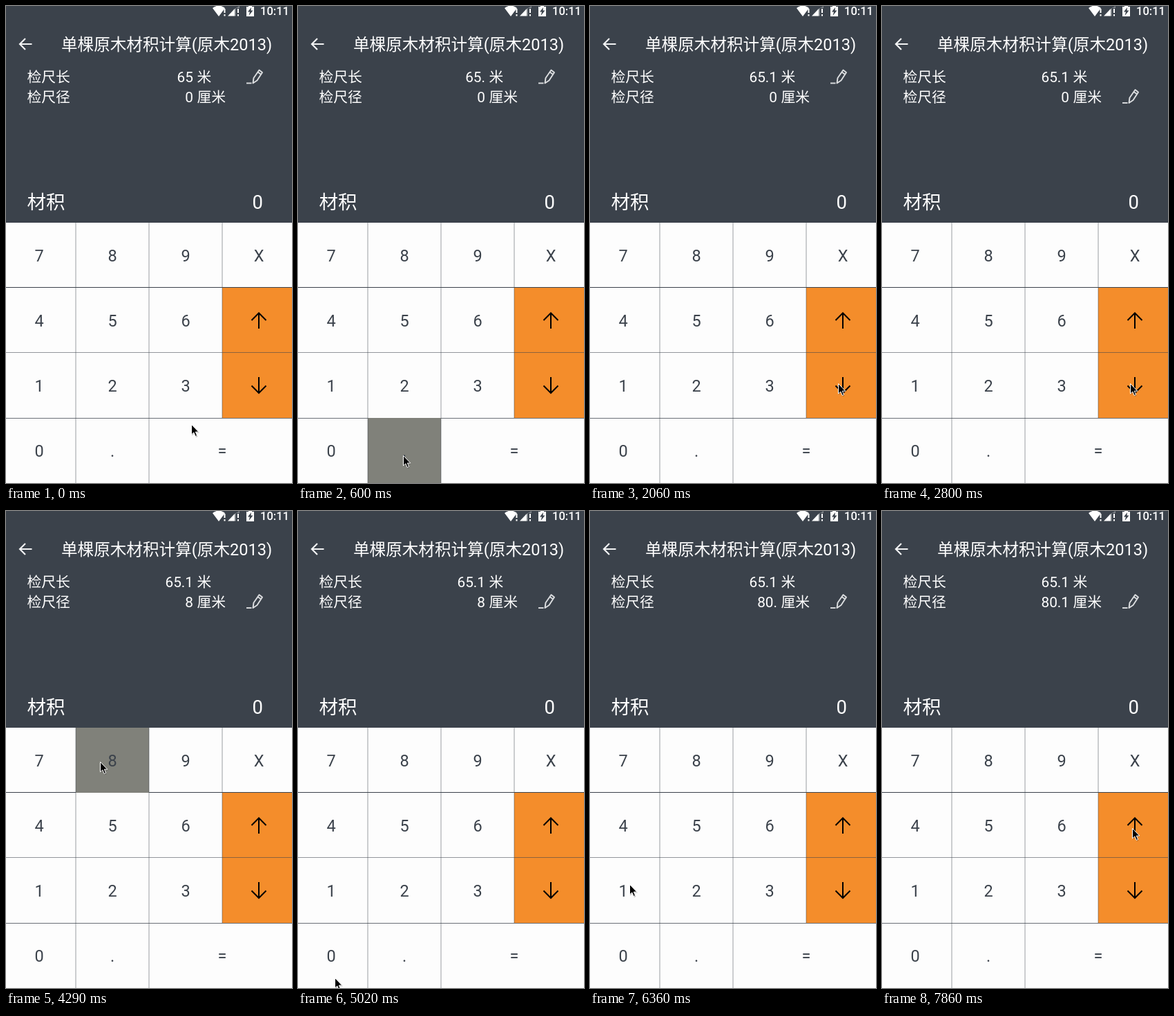
Recreate the animation shown at these times as an HTML page. Size 414x689 px, loop 8 s.

```html
<!DOCTYPE html>
<html lang="zh-CN">
<head>
<meta charset="utf-8">
<style>
html, body { margin: 0; width: 100%; height: 100%; overflow: hidden; background: #fdfdfd; }
svg { display: block; width: 414px; height: 689px; }
text { font-family: Roboto, "Noto Sans CJK SC", "Noto Sans CJK", sans-serif; fill: #fff; white-space: pre; }
.row { font-size: 20.8px; }
.sum { font-size: 27.5px; }
.end { text-anchor: end; }
#labels text { font-size: 23.5px; text-anchor: middle; fill: #3b424b; }
</style>
</head>
<body>
<svg viewBox="0 0 414 689">
  <rect width="414" height="689" fill="#fdfdfd"/>
  <rect width="414" height="313" fill="#3b424b"/>

  <g fill="#fff">
    <path d="M299 3Q308-4 317 3L308 15Z"/>
    <path d="M321 14.5L331 4V14.5Z"/>
    <path d="M331 4L338 0V3H333V14.5H331Z" opacity=".35"/>
    <path d="M315.5 4h2v6h-2zM315.5 12h2v2.5h-2zM335 4h2v6h-2zM335 12h2v2.5h-2z"/>
    <path d="M348 1H351V0H356V1H359V15H348Z"/>
  </g>
  <path d="M355 2L350 8.5H353L351.5 14L357.5 6.5H354.5Z" fill="#3b424b"/>
  <text x="368" y="13.3" font-size="16.5" font-weight="500">10:11</text>

  <path d="M37.5 55H21M28 47L20 55L28 63" fill="none" stroke="#f2f3f4" stroke-width="2.2"/>
  <text x="80" y="63.5" font-size="23.6">单棵原木材积计算(原木2013)</text>
  <g class="row">
    <text x="30.5" y="110">检尺长</text>
    <text x="30.5" y="138.7">检尺径</text>
    <text x="271" y="110" class="end value"></text>
    <text x="271" y="138.7" class="end value"></text>
    <text x="276.5" y="110">米</text>
    <text x="276.5" y="138.7">厘米</text>
  </g>
  <g class="sum">
    <text x="30.5" y="293">材积</text>
    <text x="372" y="293" class="end">0</text>
  </g>
  <g id="pencil" fill="none" stroke="#dcdee0" stroke-width="1.9">
    <path d="M348 111.5H355.5"/>
    <path d="M357.5 111.5L358.5 104L366.5 92.5L371 96L363.5 107.5ZM364.5 95.5L369.5 99" stroke-linejoin="round"/>
  </g>

  <rect x="313" y="407" width="101" height="188" fill="#f48d2b"/>
  <g stroke="#3b424b">
    <path d="M0 406.5H414"/>
    <path d="M0 500.5H414" stroke-opacity=".55"/>
    <path d="M0 595.5H414" stroke-opacity=".75"/>
  </g>
  <rect id="press" width="106" height="94" fill="#80817a"/>
  <path d="M101 313V689M207 313V689M313 313V595" stroke="#3b424b" stroke-opacity=".5"/>
  <g id="labels"></g>
  <g fill="none" stroke="#000" stroke-width="2">
    <path d="M366 466V443.5M355.5 454L366 443.5L376.5 454"/>
    <path d="M366 536V558.5M355.5 548.5L366 559L376.5 548.5"/>
  </g>

  <g id="cursor">
    <path d="M1 2V16.5L4.5 13.5L7 19L9.5 18L7.2 12.5H12Z" opacity=".25"/>
    <path d="M.5 .5V15L3.8 12L6.2 17.5L8.6 16.5L6.3 11.2H10.8Z" fill="#000" stroke="#fff"/>
  </g>
</svg>
<script>
const LOOP = 8000, TICKS = 54;
const KEYS = ['789X', '456↑', '123↓', '0.='];
const el = id => document.getElementById(id);
const values = document.querySelectorAll('.value');
const move = (node, x, y) => node.setAttribute('transform', `translate(${x} ${y})`);

KEYS.forEach((row, r) => [...row].forEach((key, c) => {
  if ('↑↓'.includes(key)) return;
  const label = document.createElementNS('http://www.w3.org/2000/svg', 'text');
  move(label, key === '=' ? 313 : 48 + 106 * c, 369 + 94 * r);
  label.textContent = key;
  el('labels').append(label);
}));

// Cursor legs, timed in ticks
const legs = [
  { from: 0, to: 2, x: 152, y: 649 },
  { from: 4, to: 7, x: 50, y: 543 },
  { from: 9, to: 14, x: 359, y: 545 },
  { from: 20, to: 24, x: 136, y: 362 },
  { from: 30, to: 34, x: 53, y: 674 },
  { from: 36, to: 40, x: 150, y: 650 },
  { from: 42, to: 44, x: 44, y: 523 },
  { from: 48, to: 53, x: 362, y: 458 }
];

// Each key lights up for one tick and takes effect at its own tick; a quick tap stays unlit.
const taps = [
  { key: '.', lit: 4, typed: 4 },
  { key: '1', lit: 8, typed: 9 },
  { key: '↓', lit: 15, typed: 16 },
  { key: '8', lit: 29, typed: 29 },
  { key: '0', lit: 36, typed: 36 },
  { key: '.', lit: 42, typed: 42 },
  { key: '1', typed: 46 }
];

function cursorAt(tick) {
  let x = 268, y = 604;
  for (const leg of legs) {
    const p = Math.min(1, Math.max(0, (tick - leg.from) / (leg.to - leg.from)));
    const eased = 1 - (1 - p) ** 3;
    x += (leg.x - x) * eased;
    y += (leg.y - y) * eased;
  }
  return [Math.round(x), Math.round(y)];
}

function typedAt(tick) {
  const fields = ['65', '0'];
  let active = 0;
  for (const { key, typed } of taps) {
    if (typed > tick) break;
    if (key === '↓') active = 1;
    else fields[active] = fields[active] === '0' ? key : fields[active] + key;
  }
  return { fields, active };
}

function draw(now) {
  // The small offset absorbs the rounding of tick times.
  const tick = Math.floor((now % LOOP) / LOOP * TICKS + 0.2);
  move(el('cursor'), ...cursorAt(tick));

  const { fields, active } = typedAt(tick);
  fields.forEach((value, i) => values[i].textContent = value);
  move(el('pencil'), 0, 28.5 * active);

  const pressed = taps.find(tap => tap.lit === tick);
  el('press').setAttribute('visibility', pressed ? 'visible' : 'hidden');
  if (pressed) {
    const row = KEYS.findIndex(keys => keys.includes(pressed.key));
    move(el('press'), 106 * KEYS[row].indexOf(pressed.key) - 5, 313 + 94 * row);
  }
  requestAnimationFrame(draw);
}
draw(0);
</script>
</body>
</html>
```
